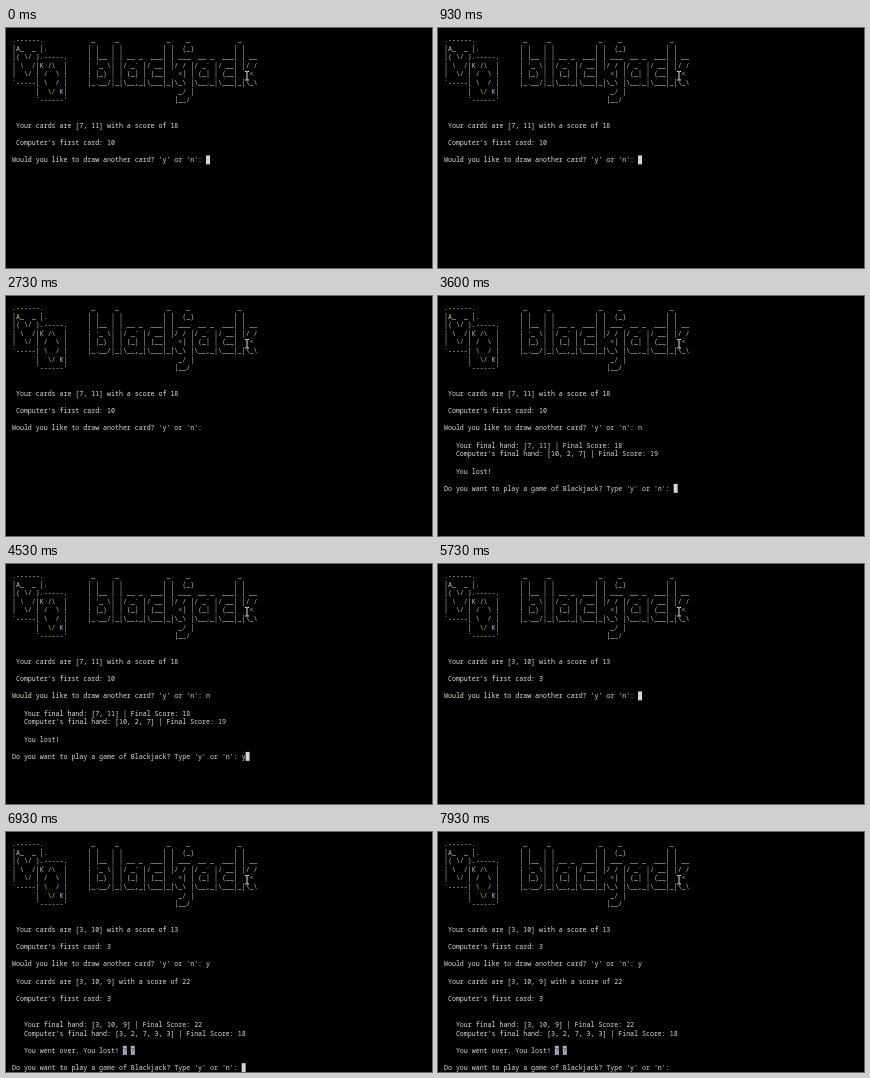
Animation, 426 px wide and 240 px high, one loop 8000 ms. Source, as an HTML page:

```html
<!DOCTYPE html>
<html lang="en">
<head>
<meta charset="utf-8">
<title>Blackjack in a terminal</title>
<style>
  html, body {
    margin: 0;
    width: 100%;
    height: 100%;
    overflow: hidden;
    background: #000;
  }
  /* Set large and scaled down so the character grid stays fractional. */
  pre {
    position: absolute;
    left: 6px;
    margin: 0;
    font: 100px/131px "Noto Sans Mono", "DejaVu Sans Mono", monospace;
    font-variant-ligatures: none;
    color: #dcdcd6;
    transform: scale(.066);
    transform-origin: 0 0;
  }
  #art {
    top: 7px;
    color: transparent;
    background: repeating-linear-gradient(90deg, #c9c48c 0 120px, #b4b6cc 180px 210px, #c9c48c 270px);
    -webkit-background-clip: text;
    background-clip: text;
  }
  #log { top: 93.46px; }
  .caret { background: #d6d6d0; }
  .box { background: #aab4c2; color: #303840; }
  svg { position: absolute; left: 238px; top: 43px; }
</style>
</head>
<body>
<pre id="art">
.------.            _     _            _    _            _
|A_  _ |.          | |   | |          | |  (_)          | |
|( \/ ).-----.     | |__ | | __ _  ___| | ___  __ _  ___| | __
| \  /|K /\  |     | '_ \| |/ _` |/ __| |/ / |/ _` |/ __| |/ /
|  \/ | /  \ |     | |_) | | (_| | (__|   &lt;| | (_| | (__|   &lt;
`-----| \  / |     |_.__/|_|\__,_|\___|_|\_\ |\__,_|\___|_|\_\
      |  \/ K|                            _/ |
      `------'                           |__/
</pre>
<pre id="log"></pre>
<svg width="6" height="10" fill="none" stroke="#e4e4e4">
  <path d="M1 .5H2.5L3 1L3.5 .5H5M3 1V8.5M1 9H2.5L3 8.5L3.5 9H5"/>
</svg>
<script>
const LOOP = 8000;
const BLINK = 530;
const log = document.getElementById('log');

const deal = (cards, score, first) =>
  ` Your cards are [${cards}] with a score of ${score}\n\n Computer's first card: ${first}\n\n`;
const result = (hand, score, dealer, dealerScore, verdict) =>
  `   Your final hand: [${hand}] | Final Score: ${score}\n` +
  `   Computer's final hand: [${dealer}] | Final Score: ${dealerScore}\n\n` +
  `   ${verdict}\n\n`;

const draw = "Would you like to draw another card? 'y' or 'n': ";
const again = "Do you want to play a game of Blackjack? Type 'y' or 'n': ";
const box = '<span class="box">?</span>';

const opening = deal('7, 11', 18, 10) + draw;
const lost = opening + 'n\n\n' +
  result('7, 11', 18, '10, 2, 7', 19, 'You lost!') + again;
const second = deal('3, 10', 13, 3) + draw;
const bust = second + 'y\n\n' + deal('3, 10, 9', 22, 3) + '\n' +
  result('3, 10, 9', 22, '3, 2, 7, 3, 3', 18, `You went over. You lost! ${box} ${box}`) + again;

// Each screen starts at a time, which also restarts the caret blink.
const screens = [
  [-160, opening],
  [2800, opening + 'n'],
  [3200, lost],
  [4470, lost + 'y'],
  [4660, second],
  [6400, second + 'y'],
  [6900, bust],
];

let shown = '';
function frame(now) {
  const t = now % LOOP;
  const [start, text] = screens.findLast(([at]) => at <= t);
  const caretOn = Math.floor((t - start) / BLINK) % 2 === 0;
  const html = text + (caretOn ? '<span class="caret"> </span>' : '');
  if (html !== shown) log.innerHTML = shown = html;
  requestAnimationFrame(frame);
}
frame(0);
</script>
</body>
</html>
```
